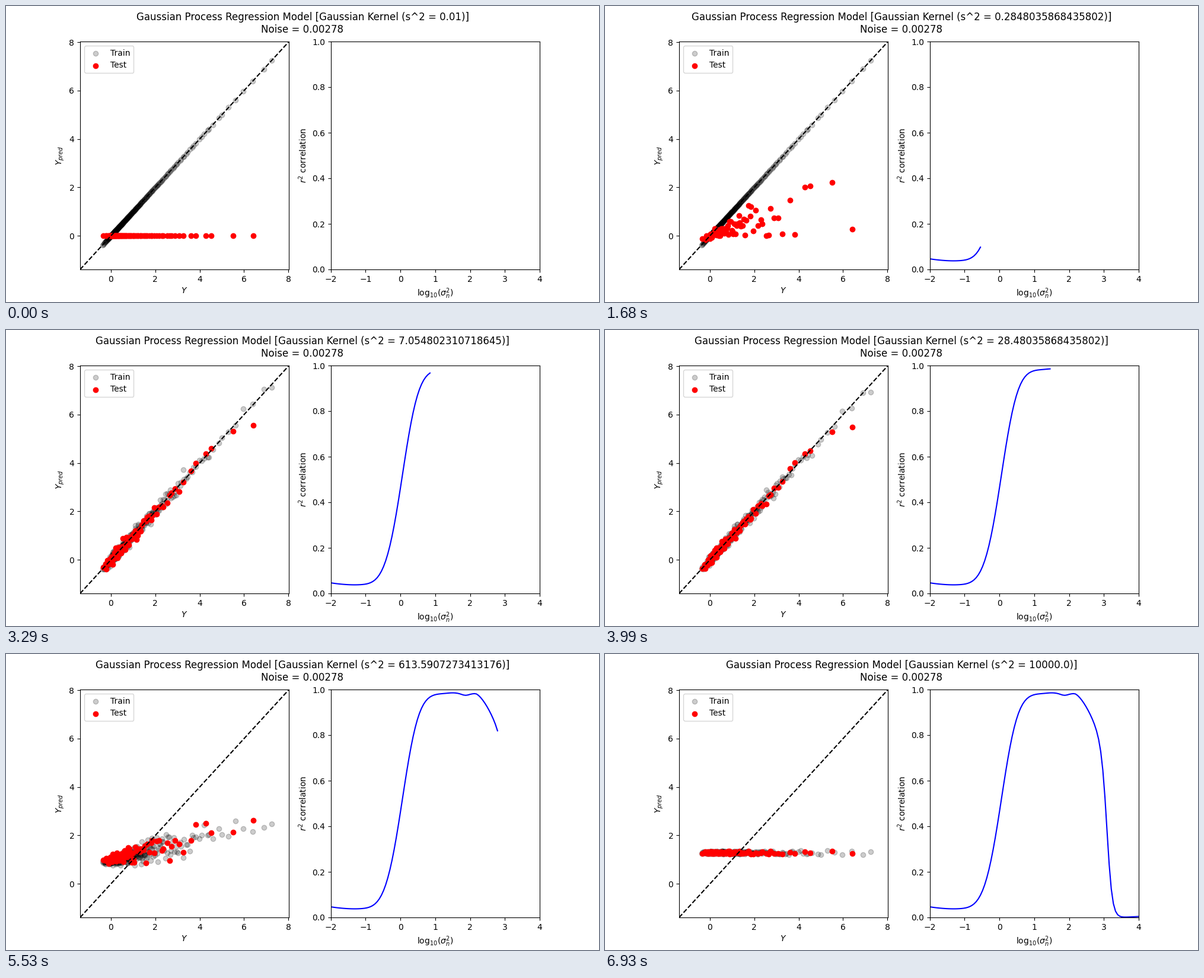
Recreate the animation shown at these times as a matplotlib script. Size 1000 by 500 pixels, loop 7 s.

```python
import numpy as np
import matplotlib.pyplot as plt
from matplotlib.animation import FuncAnimation

FRAMES, INTERVAL = 100, 70
NOISE = 0.00278
LOW, HIGH = -1.39, 8.03
rng = np.random.default_rng(12)

widths = np.logspace(-2, 4, FRAMES)
log_widths = np.linspace(-2, 4, FRAMES)

# log10 kernel widths: best fit, smooth fit, flattened, nearly constant.
FIT, SMOOTH, FLAT, CONST = 0.85, 2.06, 2.79, 4.0


def logistic(x):
    return 1 / (1 + np.exp(-x))


def correlation(u):
    """r^2 against log10 width: rise, plateau, slow sag, sharp drop."""
    base = .0375 + .016 * np.minimum(u + 1.25, 0) ** 2
    rise = .945 * logistic(-.2 + 4.2 * u + 1.2 * u ** 3)
    ripple = .003 * np.exp(-((u - 1.5) / .2) ** 2) \
        - .008 * np.exp(-((u - 1.87) / .15) ** 2)
    sag = .15 * (np.maximum(u - 2.15, 0) / .64) ** 1.5
    tail = .008 * np.maximum(u - 3.5, 0)
    return (base + rise + ripple - sag) * logistic(13 * (3.1 - u)) + tail


def skewed(count, scale, power, depth):
    """Long-tailed values, dense near zero, with a few below it."""
    rank = (np.arange(count) + rng.uniform(.1, .9, count)) / count
    e = -np.log(1 - rank * (1 - np.exp(-depth)))
    return -.04 + scale * e ** power - .35 * np.exp(-25 * e)


def scatter_around(mean, y, base, growth):
    return mean + rng.normal(size=len(y)) * (base + growth * np.clip(y, 0, 2.5))


def shrunk(y, amount):
    """The identity, bending down above 4."""
    return y - amount * np.maximum(y - 4, 0) ** 2


def progress(u):
    """Monotone clock that runs fastest while the model flattens out."""
    return u - 8 / (1 + (10 ** u / 340) ** 1.6)


STAGES = [progress(u) for u in (FIT, SMOOTH, FLAT, CONST)]


def oversmoothed(u, keys):
    """Blend the predictions between FIT and CONST."""
    q = progress(u)
    k = int(np.clip(np.searchsorted(STAGES, q) - 1, 0, 2))
    t = np.clip((q - STAGES[k]) / (STAGES[k + 1] - STAGES[k]), 0, 1)
    return keys[k] + (keys[k + 1] - keys[k]) * t


def falloff(u):
    return 10 ** (-0.9 * u)


test_y = skewed(87, 1.1, 1.25, 4.4)
test_keys = (scatter_around(shrunk(test_y, .17), test_y, .12, .02),
             scatter_around(shrunk(test_y, .15), test_y, .15, .01),
             scatter_around(1 + .25 * test_y, test_y, .07, .1),
             1.29 + rng.uniform(-.05, .05, len(test_y)) * (1 + test_y / 6))
# How far each test point lies from its training neighbours.
distance = .12 + rng.exponential(.15 + .2 * np.clip(test_y, 0, 7))

train_y = skewed(300, .97, 1.3, 5)
train_keys = (scatter_around(train_y, train_y, .1, .01),
              scatter_around(shrunk(train_y, .06), train_y, .11, .06),
              scatter_around(.94 + .23 * train_y, train_y, .06, .1),
              1.29 + rng.uniform(-.05, .05, len(train_y)) * (1 + train_y / 6))


def predict_test(u):
    if u > FIT:
        return oversmoothed(u, test_keys)
    return test_keys[0] * np.exp(-distance * (falloff(u) - falloff(FIT)))


def predict_train(u):
    if u > FIT:
        return oversmoothed(u, train_keys)
    loose = np.clip((u + .7) / (FIT + .7), 0, 1) ** 2
    return train_y + (train_keys[0] - train_y) * loose


r2 = correlation(log_widths)

fig, (fit_ax, corr_ax) = plt.subplots(1, 2, figsize=(10, 5), dpi=100)
title = fig.suptitle("")

train_dots = fit_ax.scatter(train_y, train_y, color="k", alpha=.2, label="Train")
test_dots = fit_ax.scatter(test_y, 0 * test_y, color="r", label="Test")
fit_ax.plot([LOW, HIGH], [LOW, HIGH], "k--")
fit_ax.set(xlim=(LOW, HIGH), ylim=(LOW, HIGH), xlabel="$Y$", ylabel="$Y_{pred}$",
           xticks=range(0, 9, 2), yticks=range(0, 9, 2))
fit_ax.legend(loc="upper left")

curve, = corr_ax.plot([], [], "b-")
corr_ax.set(xlim=(-2, 4), ylim=(0, 1), xlabel=r"log$_{10}$($\sigma_n^2$)",
            ylabel="$r^2$ correlation")


def update(i):
    u = log_widths[i]
    title.set_text("Gaussian Process Regression Model "
                   f"[Gaussian Kernel (s^2 = {widths[i]})]\nNoise = {NOISE}")
    train_dots.set_offsets(np.column_stack([train_y, predict_train(u)]))
    test_dots.set_offsets(np.column_stack([test_y, predict_test(u)]))
    curve.set_data(log_widths[:i + 1], r2[:i + 1])
    return title, train_dots, test_dots, curve


anim = FuncAnimation(fig, update, frames=FRAMES, interval=INTERVAL,
                     repeat=True, repeat_delay=0)
plt.show()
```
